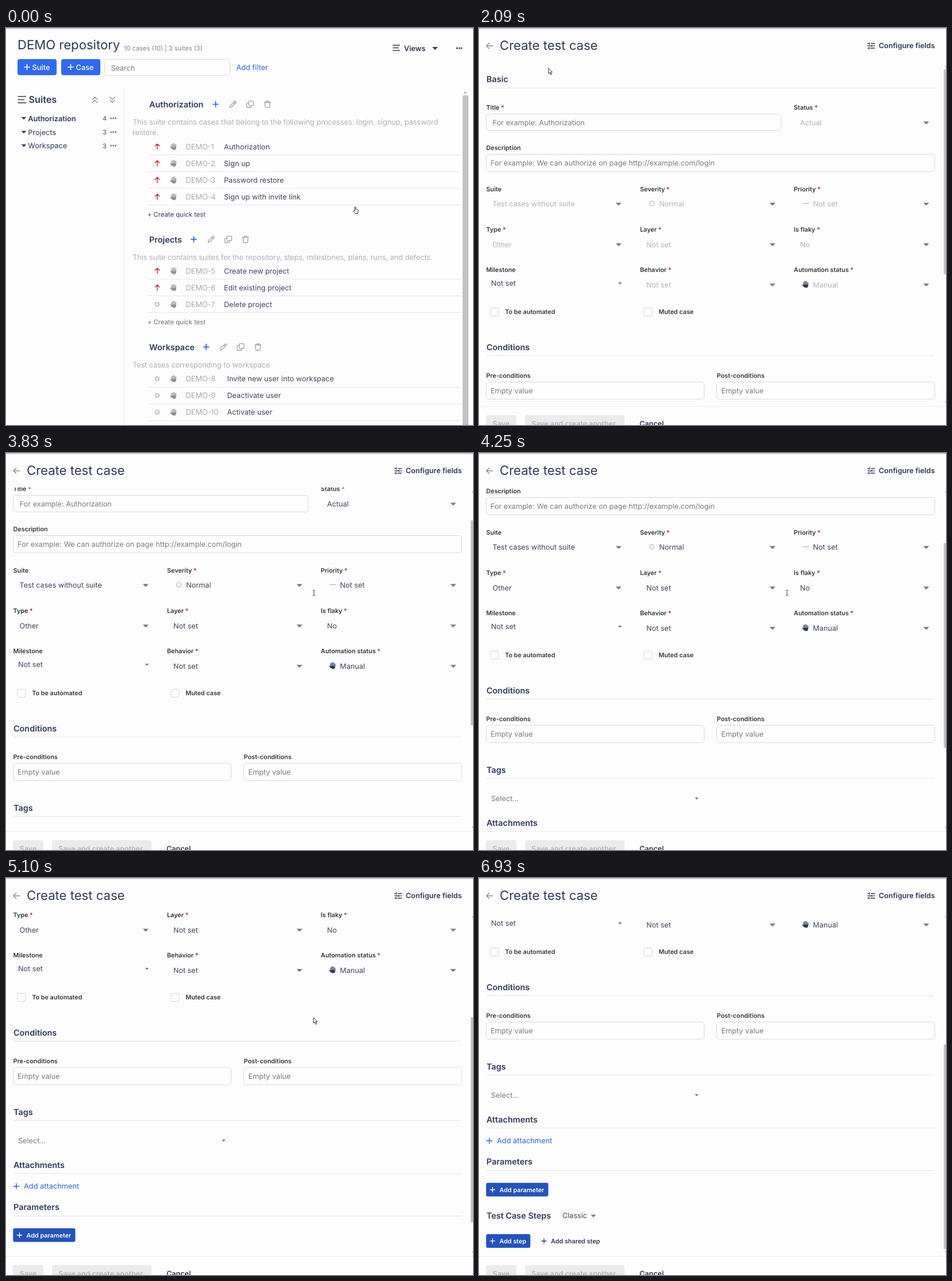
Animation, 812 px wide and 690 px high, one loop 7490 ms. Source, as an HTML page:

```html
<!DOCTYPE html>
<html lang="en">
<head>
<meta charset="utf-8">
<title>Test case repository</title>
<style>
  html, body { margin: 0; width: 100%; height: 100%; overflow: hidden; background: #fdfdfd; }
  svg { display: block; width: 812px; height: 690px; font-family: Inter, sans-serif; text-rendering: geometricPrecision; }
  text { white-space: pre; }
</style>
</head>
<body>
<svg id="stage" viewBox="0 0 812 690" xmlns="http://www.w3.org/2000/svg"></svg>
<script>
const LOOP = 7490;
const INK = '#2f3a59', BODY = '#3d465f', MUTED = '#9599a5', BLUE = '#2d62e3', DEEP = '#2453bd';

// ---- drawing helpers (y is the middle of the capitals) ----
const text = (x, y, str, size = 12.65, fill = BODY, weight = 400) =>
  `<text x="${x}" y="${y + size * 0.364}" font-size="${size}" fill="${fill}" font-weight="${weight}">${str}</text>`;
const rect = (x, y, w, h, fill, r = 0, extra = '') =>
  `<rect x="${x}" y="${y}" width="${w}" height="${h}" rx="${r}" fill="${fill}" ${extra}/>`;
const line = (x, y, w, fill = '#e6e8ea') => rect(x, y, w, 1, fill);
const stroke = (x, y, d, color, width = 1.3) =>
  `<path transform="translate(${x} ${y})" d="${d}" fill="none" stroke="${color}" stroke-width="${width}" stroke-linecap="round" stroke-linejoin="round"/>`;
const shape = (x, y, d, fill) => `<path transform="translate(${x} ${y})" d="${d}" fill="${fill}"/>`;
const plus = (x, y, r, color, width = 1.6) => stroke(x, y, `M${-r} 0H${r}M0 ${-r}V${r}`, color, width);
const caret = (x, y, r = 5, fill = '#6f7690') => shape(x, y, `M${-r} ${-r / 2}H${r}L0 ${r / 2}Z`, fill);
const dots = (x, y, gap, r, fill) =>
  [-gap, 0, gap].map(d => `<circle cx="${x + d}" cy="${y}" r="${r}" fill="${fill}"/>`).join('');
const ring = (x, y, r, color) => `<circle cx="${x}" cy="${y}" r="${r}" fill="none" stroke="${color}" stroke-width="1.5"/>`;
const palm = (x, y, color) =>
  stroke(x, y, 'M-2.7 1V-3.8M-.4 0V-5.4M1.9 0V-4.9M4.2 1V-3.4M-5 .8L-2.8 3.4', color, 1.4) +
  shape(x, y, 'M-3.3 .2H4.9V2Q4.9 6 1.2 6Q-1.6 6 -3.8 3Z', color);
const box = (x, y, w, h) => rect(x, y, w, h, '#fefefe', 5, 'stroke="#d5d9dc"');

const ICON = {
  up: 'M0 4.8V-4.4M-3.7 -.9L0 -4.6L3.7 -.9',
  pencil: 'M-5.3 5.3L-4.4 1.8L3 -5.2Q4 -6 5 -5Q6 -4 5.1 -3L-2 4.4ZM1.4 -3.6L3.6 -1.4',
  copy: 'M-1.6 -5.5H4.4Q5.8 -5.5 5.8 -4.2V1.2Q5.8 2.5 4.4 2.5H-1.6Q-2.5 2.5 -2.5 1.2V-4.2Q-2.5 -5.5 -1.6 -5.5ZM-2.6 -2.3H-5Q-6 -2.3 -6 -1.2V4.4Q-6 5.6 -5 5.6H1Q2 5.6 2 4.4V2.7',
  trash: 'M-5.3 -3.4H5.3M-2 -3.6V-5.6H2V-3.6M-4.3 -3.2L-3.9 4.8Q-3.8 5.8 -2.8 5.8H2.8Q3.8 5.8 3.9 4.8L4.3 -3.2',
  chevrons: 'M-4.4 -.6L0 -4.8L4.4 -.6M-4.4 4.6L0 .4L4.4 4.6',
};

// ---- repository page ----
function suite(y, name, iconX, about, rows, firstRow, labelX) {
  let out = text(249, y, name, 14.4, INK, 600) + plus(iconX, y, 4.6, BLUE, 1.7);
  ['pencil', 'copy', 'trash'].forEach((key, i) => out += stroke(iconX + 30 * (i + 1), y, ICON[key], '#8a909f', 1.1));
  about.forEach((str, i) => out += text(220, y + 31.3 + 18 * i, str, 12.88, MUTED, 300));
  rows.forEach(([id, label, high], i) => {
    const ry = firstRow + 29.1 * i;
    out += high ? stroke(263, ry, ICON.up, '#cc2529', 1.4) : ring(263, ry, 3.2, '#b2b5bb');
    out += palm(291, ry, '#8b90a0') + text(312.5, ry, 'DEMO-' + id, 12.85, '#8b90a0', 300);
    out += text(labelX, ry, label) + line(248, Math.round(ry + 14), 544);
  });
  return out;
}

const quick = (y, id = '') => `<g id="${id}" fill="#6a6f7d">${text(246, y, '+ Create quick test', 11.25, 'inherit')}</g>`;
const mainButton = (x, label, id) =>
  `<rect id="${id}" x="${x}" y="54" width="68" height="28" rx="4" fill="#3069f0"/>` +
  plus(x + 16.5, 68, 4.8, '#fff', 1.5) + text(x + 25.5, 68, label, 12.8, '#fff', 500);
const branch = (y, name, count, weight) =>
  caret(31, y, 4.4, INK) + text(38.3, y, name, 12.7, INK, weight) +
  text(168, y, count, 11, BODY) + dots(186.5, y, 4, 1.4, '#68708a');

const repository = `<g id="repo">
  ${text(20, 29.2, 'DEMO repository', 22.1, INK)}
  ${text(205, 35, '10 cases (10) | 3 suites (3)', 11.05, '#7f8595')}
  ${stroke(672, 34.5, 'M1 -4.5H12.5M1 0H10.5M1 4.5H12.5', INK, 1.3)}
  ${text(692, 35.5, 'Views', 12.7, INK, 600)}${caret(746, 35.5, 5, INK)}${dots(788, 35, 4, 1.5, INK)}
  ${mainButton(20, 'Suite', 'suiteBtn')}${mainButton(96, 'Case', 'caseBtn')}
  ${box(171.5, 54.5, 218, 28)}${text(182.5, 69, 'Search', 12.55, '#757a88')}
  ${text(400.5, 68.5, 'Add filter', 12.7, BLUE)}
  <g id="chevBack">${rect(142, 112, 25, 25, '#f4f5f7', 5)}${rect(172, 112, 25, 25, '#f4f5f7', 5)}</g>
  ${stroke(20, 124.5, 'M1 -5.5H14.5M1 0H11.5M1 5.5H14.5', INK, 1.5)}
  ${text(39.5, 124.5, 'Suites', 16.2, INK, 600)}
  ${stroke(154.5, 125, ICON.chevrons, '#7a8195', 1.2)}
  <g transform="rotate(180 185 124.5)">${stroke(185, 124.5, ICON.chevrons, '#7a8195', 1.2)}</g>
  ${branch(157, 'Authorization', 4, 600)}${branch(181, 'Projects', 3, 400)}${branch(204.5, 'Workspace', 3, 400)}
  ${rect(205, 104, 1, 586, '#e3e5e8')}
  <g id="headBack">${rect(212, 111, 580, 43, '#f3f4f6', 4)}</g>
  ${suite(132.5, 'Authorization', 364.5,
    ['This suite contains cases that belong to the following processes: login, signup, password', 'restore.'],
    [[1, 'Authorization', 1], [2, 'Sign up', 1], [3, 'Password restore', 1], [4, 'Sign up with invite link', 1]], 206, 379)}
  ${quick(324, 'quick')}
  ${suite(367.3, 'Projects', 326.5,
    ['This suite contains suites for the repository, steps, milestones, plans, runs, and defects.'],
    [[5, 'Create new project', 1], [6, 'Edit existing project', 1], [7, 'Delete project', 0]], 422, 379)}
  ${quick(511)}
  ${suite(554.3, 'Workspace', 348, ['Test cases corresponding to workspace'],
    [[8, 'Invite new user into workspace', 0], [9, 'Deactivate user', 0], [10, 'Activate user', 0]], 609.5, 384.5)}
  ${rect(794, 117, 10, 573, '#c1c1c1')}${shape(798.5, 112, 'M-3 1.5L0 -1.5L3 1.5Z', '#a3a3a3')}
</g>`;

// ---- form page ----
const heading = (y, str, rule = true) => text(13, y, str, 14.4, INK, 600) + (rule ? line(13, Math.floor(y + 15), 779) : '');
const label = (x, y, str, needed) =>
  text(x, y, str + (needed ? '<tspan dx="2.5" fill="#b5242b">*</tspan>' : ''), 10.8, '#32363f', 600);
const pick = (x, y, value, gap = 11) =>
  `<g class="value">${text(x + gap, y, value, 12.6)}</g>` + caret(x + 230.3, y + 0.7);
const field = (x, y, name, value, needed = true, gap = 11) => label(x, y, name, needed) + pick(x, y + 25.8, value, gap);
const check = (x, str) => rect(x + 7.5, 486.5, 14, 14, '#fefefe', 3, 'stroke="#cfd3d7"') + label(x + 32.7, 493.3, str);
const entry = (x, y, w, h, str, pad) => box(x, y, w, h) + text(x + pad, y + h / 2, str, 12.65, '#757a86');
const deepButton = (y, w, str) =>
  rect(12.3, y - 0.2, w, 23.8, DEEP, 3) + plus(23.5, y + 11.7, 4, '#fff', 1.4) + text(35.5, y + 11.7, str, 10.8, '#fff', 600);
const [C1, C2, C3] = [12.5, 280, 547.3];

const form = `<g id="form">
  ${stroke(18.5, 31, 'M5.5 0H-5.5M-1 -4.6L-5.6 0L-1 4.6', '#8a8e99', 1.5)}
  ${text(36, 30, 'Create test case', 22.1, INK)}
  ${stroke(682, 31, 'M-6 -4H-3M0 -4H6M-6 0H1M4 0H6M-6 4H-4M-1 4H6M-3 -5.3V-2.7M1.5 -1.3V1.3M-3.5 2.7V5.3', INK, 1.3)}
  ${text(695, 30.7, 'Configure fields', 12.6, INK, 600)}
  <clipPath id="port"><rect y="60" width="812" height="598"/></clipPath>
  <g clip-path="url(#port)"><g id="scroller">
    ${heading(89, 'Basic')}
    ${label(C1, 138.5, 'Title', 1)}${entry(12.5, 149.5, 513, 29, 'For example: Authorization', 11.3)}
    ${field(C3, 138.5, 'Status', 'Actual')}
    ${label(C1, 208.5, 'Description')}
    ${entry(12.5, 219.5, 780, 30, 'For example: We can authorize on page http://example.com/login', 7.5)}
    ${field(C1, 279.7, 'Suite', 'Test cases without suite', false)}
    ${field(C2, 279.7, 'Severity', 'Normal', true, 33.3)}${ring(300.5, 305, 4, '#bfc1c4')}
    ${field(C3, 279.7, 'Priority', 'Not set', true, 33.5)}${rect(562, 304, 12, 2, '#cbcdd0', 1)}
    ${field(C1, 350.2, 'Type', 'Other')}${field(C2, 350.2, 'Layer', 'Not set')}${field(C3, 350.2, 'Is flaky', 'No')}
    ${label(C1, 420.3, 'Milestone')}${text(21, 443.7, 'Not set', 12.65)}${caret(245, 444, 3.4)}
    ${field(C2, 420.3, 'Behavior', 'Not set')}
    ${field(C3, 420.3, 'Automation status', 'Manual', true, 33.3)}${palm(567.5, 445.5, INK)}
    ${check(C1, 'To be automated')}${check(C2 - 0.5, 'Muted case')}
    ${heading(554.7, 'Conditions')}
    ${label(C1, 604, 'Pre-conditions')}${entry(12.5, 615.2, 379, 30, 'Empty value', 7.5)}
    ${label(413.5, 604, 'Post-conditions')}${entry(413.5, 615.2, 379, 30, 'Empty value', 7.8)}
    ${heading(692.5, 'Tags')}
    ${text(21, 742, 'Select...', 12.65, '#757a88')}${caret(378.5, 742.5, 3.4)}
    ${heading(784.5, 'Attachments')}
    ${plus(18, 821.7, 4.8, BLUE, 1.4)}${text(31, 821.7, 'Add attachment', 12.8, BLUE)}
    ${heading(858, 'Parameters')}
    ${deepButton(895, 108.2, 'Add parameter')}
    ${heading(951.7, 'Test Case Steps', false)}${text(145, 951.7, 'Classic', 12.65)}${caret(199, 952.5, 4.6)}
    ${deepButton(984.2, 77, 'Add step')}
    ${plus(113, 996, 4, INK, 1.3)}${text(125, 996, 'Add shared step', 10.8, INK, 600)}
  </g></g>
  ${rect(0, 657, 812, 1, '#e9eaeb')}
  ${rect(12, 673, 53, 30, '#ebebeb', 4)}${text(23.5, 687.5, 'Save', 12.5, '#b4b4b6', 600)}
  ${rect(80, 673, 173, 30, '#ebebeb', 4)}${text(91, 687.5, 'Save and create another', 12.5, '#b4b4b6', 600)}
  ${text(279, 687.5, 'Cancel', 12.6, INK, 600)}
  <g id="thumb">${rect(808, 72, 4, 356, '#c1c1c1')}</g>
  ${rect(810.5, 67, 1.5, 1.5, '#8c8c8c')}${rect(810.5, 649.5, 1.5, 1.5, '#8c8c8c')}
</g>`;

const outline = 'fill="#fff" stroke="#333" stroke-width="1" stroke-linejoin="round"';
const cursors = `<g id="cursor">
  <path id="hand" d="M3.4 8V1.5Q3.4 .5 4.3 .5T5.2 1.5V5L8.4 5.7Q9.6 6 9.4 7.2L8.4 12.5H4.1L1 8.8Q.3 7.7 1.2 7.2T3.4 8.4Z" ${outline}/>
  <path id="arrow" d="M.8 .7V10.2L3 8.3L4.6 12.2L6.3 11.5L4.7 7.7H7.4Z" ${outline}/>
  <path id="beam" d="M.5 .6H2L2.6 1.2L3.2 .6H4.7M2.6 1V9.2M.5 9.6H2L2.6 9L3.2 9.6H4.7" fill="none" stroke="#444"/>
</g>`;

const $ = id => document.getElementById(id);
$('stage').innerHTML = rect(0, 0, 812, 690, '#fdfdfd') + repository + form + rect(0, 0.5, 812, 1, '#9c9c9c') + cursors;

// ---- timeline: every row holds from its time (ms) until the next ----
const POINTER = [
  [0, 'hand', 603, 310], [130, 'arrow', 554, 287], [280, 'arrow', 300, 128], [400, 'arrow', 152, 35],
  [550, 'arrow', 138, 40], [670, 'arrow', 118, 44], [790, 'arrow', 102, 54], [910, 'arrow', 98, 70],
  [1030, 'arrow', 104, 84], [1150, 'arrow', 118, 90], [1270, 'arrow', 128, 80],
  [1390, 'hand', 125, 59], [1540, 'hand', 120, 70], [1690, 'hand', 117, 70], [1820, 'hand', 119, 69],
  [1970, 'arrow', 120, 69], [2610, 'arrow', 213, 97], [2760, 'arrow', 355, 143], [2910, 'arrow', 460, 190],
  [3040, 'beam', 526, 225], [3190, 'beam', 533, 238], [4550, 'arrow', 534, 242],
  [6370, 'arrow', 690, 441], [6500, 'arrow', 755, 545], [6650, 'arrow', 772, 612], [6780, 'arrow', 788, 680],
  [6930, 'none', 0, 0],
];
const SCROLL = [
  [0, 0], [3590, 30], [3710, 49], [3830, 76], [3980, 112], [4130, 128], [4250, 142], [4400, 152.7],
  [4860, 229], [4980, 272], [5100, 286], [5250, 355], [5370, 365],
];
const VALUE_FADE = [[0, 0.4], [2240, 0.75], [2360, 1]];
const at = (table, t) => table.findLast(row => row[0] <= t);
const show = (id, on) => $(id).setAttribute('visibility', on ? 'visible' : 'hidden');
const move = (id, x, y) => $(id).setAttribute('transform', `translate(${x} ${y})`);
const values = document.querySelectorAll('.value');

function render(t) {
  const onForm = t >= 1970;
  $('repo').style.display = onForm ? 'none' : '';
  $('form').style.display = onForm ? '' : 'none';
  $('form').setAttribute('opacity', t < 2090 ? 0.5 : 1);

  $('quick').firstChild.setAttribute('fill', t < 130 ? INK : '#6a6f7d');
  $('headBack').setAttribute('opacity', t >= 280 ? 1 : 0);
  $('chevBack').setAttribute('opacity', t >= 400 ? 1 : 0);
  $('caseBtn').setAttribute('fill', t >= 1390 ? '#4a7ef5' : '#3069f0');

  const scroll = at(SCROLL, t)[1];
  move('scroller', 0, -scroll);
  move('thumb', 0, scroll * 0.5945);
  values.forEach(v => v.setAttribute('opacity', at(VALUE_FADE, t)[1]));

  const [, kind, x, y] = at(POINTER, t);
  move('cursor', x, y);
  ['hand', 'arrow', 'beam'].forEach(id => show(id, id === kind));
}

const start = performance.now();
function tick() {
  render((performance.now() - start) % LOOP);
  requestAnimationFrame(tick);
}
tick();
</script>
</body>
</html>
```
